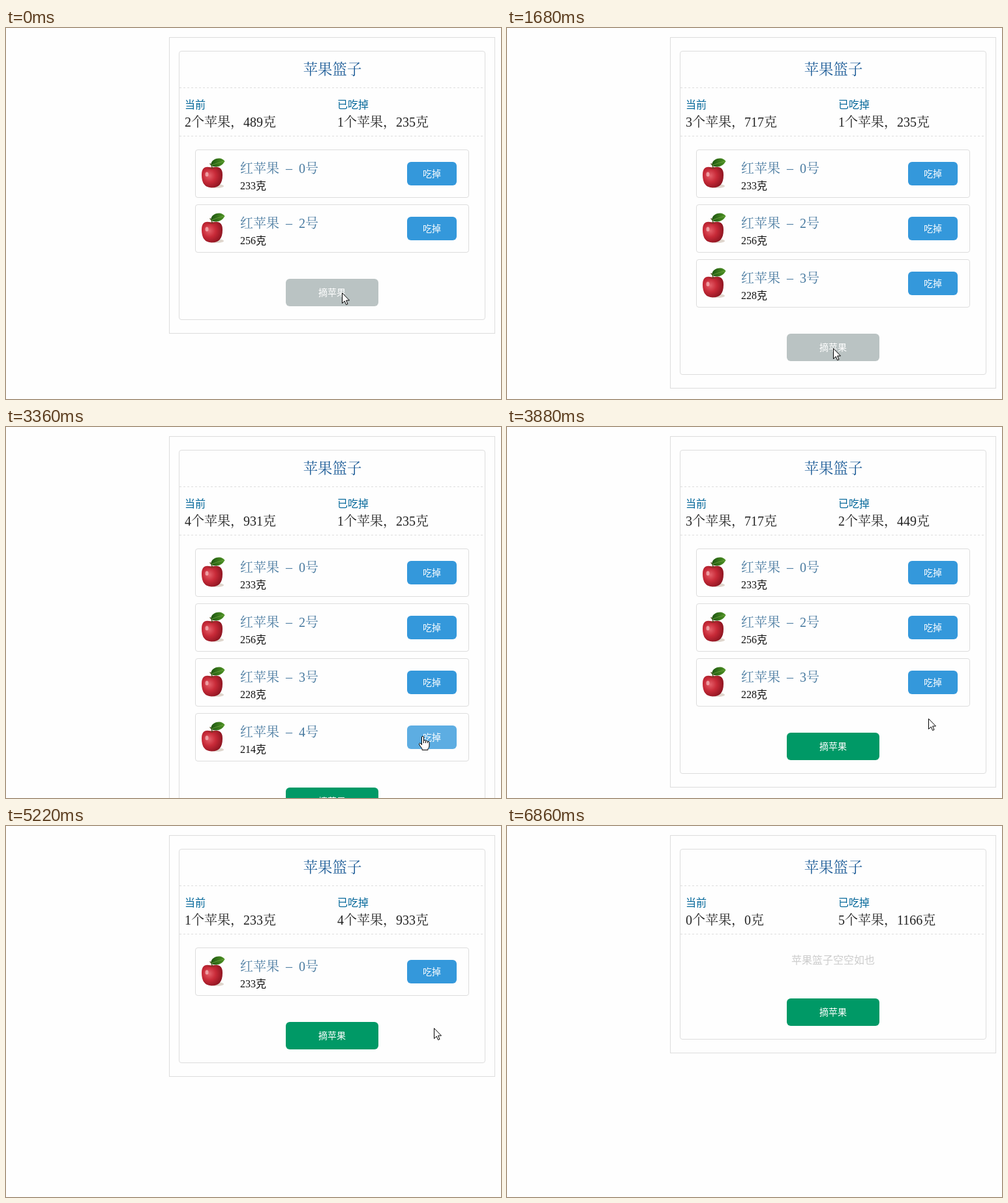
These frames come from a looping animation (759x568 px, 7770 ms). An HTML page:

```html
<!DOCTYPE html>
<html lang="zh-CN">
<head>
<meta charset="utf-8">
<title>苹果篮子</title>
<style>
html, body { margin: 0; width: 100%; height: 100%; overflow: hidden; background: #fefefe; }
body { position: relative; font: 300 16px/24px "Liberation Serif", "Noto Sans CJK SC", "Noto Sans CJK", serif; color: #111; }
div, svg { position: absolute; box-sizing: border-box; white-space: nowrap; }
#outer { left: 250px; top: 14px; width: 500px; border: 1px solid #ddd; }
#card { left: 265px; top: 35px; width: 470px; border: 1px solid #ddd; border-radius: 4px; }
.rule { left: 266px; width: 468px; height: 1px; background: repeating-linear-gradient(90deg, #ddd 0 3px, transparent 3px 6px); }
.title, .value, .name { font-family: "Liberation Serif", "Noto Serif CJK SC", "Noto Sans CJK SC", "Noto Sans CJK", serif; }
.title { left: 266px; width: 469px; top: 52px; text-align: center; font-size: 22.4px; font-weight: 500; color: #1a5a96; }
.label { top: 106px; color: #069; }
.value { top: 132px; font-size: 20px; color: #222; }
.left { left: 274px; }
.right { left: 508px; }
.item { left: 290px; width: 420px; height: 74px; border: 1px solid #ddd; border-radius: 4px; }
.item svg { left: -1px; top: -1px; }
.name { left: 68px; top: 16px; font-size: 20px; word-spacing: 5px; color: #47799f; }
.weight { left: 68px; top: 43px; }
.btn { color: #fff; font-size: 14px; text-align: center; border-radius: 6px; }
.eat { left: 324px; top: 18px; width: 76px; height: 36px; line-height: 37px; background: #3498db; }
.eat.hover { background: #5dade2; }
#pick { left: 429px; width: 142px; height: 42px; line-height: 43px; }
#list { left: 0; top: 0; }
#empty { left: 265px; width: 470px; top: 194px; text-align: center; color: #ccc; }
#cursor { left: 0; top: 0; overflow: visible; }
</style>
</head>
<body>
<div id="outer"></div>
<div id="card"></div>
<div class="title">苹果篮子</div>
<div class="rule" style="top:91px"></div>
<div class="rule" style="top:165px"></div>
<div class="label left">当前</div>
<div class="label right">已吃掉</div>
<div class="value left" id="now"></div>
<div class="value right" id="eaten"></div>
<div id="list"></div>
<div id="empty">苹果篮子空空如也</div>
<div class="btn" id="pick">摘苹果</div>

<svg width="0" height="0">
  <defs>
    <radialGradient id="skin" cx=".36" cy=".42" r=".7">
      <stop offset="0" stop-color="#e4606a"/>
      <stop offset=".45" stop-color="#c82a38"/>
      <stop offset="1" stop-color="#86121e"/>
    </radialGradient>
    <linearGradient id="leaf" x2="1">
      <stop offset="0" stop-color="#1d5410"/>
      <stop offset="1" stop-color="#4f9424"/>
    </linearGradient>
    <g id="apple">
      <ellipse cx="34" cy="56" rx="10" ry="3" fill="#ded5cc"/>
      <path fill="url(#skin)" d="M25 28Q10 23 10 39Q10 58 25 58.500Q42 59 42 39Q42 23 25 28Z"/>
      <path fill="#a3262b" d="M18 28.500Q26 26 33 28.500Q26 32 18 28.500Z"/>
      <path fill="none" stroke="#5a4a20" stroke-width="1.500" d="M26 29Q26 24 22.500 21.500"/>
      <path fill="url(#leaf)" d="M24 24Q25 14 37 13.500Q42 13.500 45.500 18Q41 26 33 26.500Q28 27 24 24Z"/>
      <path fill="none" stroke="#76aa46" stroke-width=".7" d="M25 24Q33 21 44 18"/>
      <ellipse cx="18" cy="38" rx="2.500" ry="3.500" fill="#f8c0c2" opacity=".7"/>
    </g>
  </defs>
</svg>

<svg id="cursor" width="1" height="1" fill="#fff" stroke="#000" stroke-linejoin="round">
  <path id="arrow" d="M.5 .7V16.500L4.200 13L6.600 18.500L9 17.500L6.600 12H11.500Z"/>
  <g id="hand">
    <path d="M-1.500 12V2Q-1.500 .5 0 .5T1.500 2V7Q3 5.500 4.500 7.500Q6 6.500 7.300 8.500Q10 7.500 10 10.500V15Q10 18 8 19.500V21.500H-1V19.500L-5 14Q-6.500 11.500-4.500 11Q-3 11-1.500 13.500Z"/>
    <path fill="none" d="M1.500 7V11M4.500 8V11M7.300 9V11"/>
  </g>
</svg>

<script>
const LOOP = 7770, TICK = 124, ROW = 84;
const apples = [[0, 233], [2, 256], [3, 228], [4, 214]];
const picks = [{ click: 0, done: 640 }, { click: 1430, done: 1800 }];
const eats = [3640, 4420, 5220, 6010];
const pointerGone = 6860;

// Pointer strokes: arrival time, number of ticks, x, y.
const strokes = [
  [0, 1, 515, 405], [240, 2, 508, 412], [1130, 4, 500, 490], [2050, 2, 511, 522],
  [2440, 3, 568, 540], [2590, 1, 557, 556], [3090, 1, 600, 539], [3360, 2, 639, 473],
  [4010, 3, 660, 391], [4690, 2, 656, 309], [5580, 3, 650, 244], [5860, 2, 636, 232],
  [6740, 4, 693, 534]
];

const $ = id => document.getElementById(id);
const passed = (times, t) => times.filter(time => time <= t).length;
const sum = rows => rows.reduce((total, [, grams]) => total + grams, 0);
const summary = (count, grams) => `${count}个苹果，${grams}克`;
const inside = ([x, y], left, top, width, height) =>
  x >= left && x < left + width && y >= top && y < top + height;

const countAt = t => 2 + passed(picks.map(p => p.done), t) - passed(eats, t);
const pickTopAt = t => countAt(t) ? 216 + ROW * countAt(t) : 264;
const overPick = (point, t) => inside(point, 429, pickTopAt(t), 142, 42);

function pointerAt(t) {
  return strokes.reduce(([px, py], [end, ticks, x, y]) => {
    const p = Math.max(0, Math.min(1, 1 + Math.floor((t - end) / TICK) / ticks));
    return [px + (x - px) * p, py + (y - py) * p];
  }, [515, 405]);
}

$("list").innerHTML = apples.map(([id, grams], i) => `
  <div class="item" style="top:${186 + ROW * i}px">
    <svg width="60" height="74"><use href="#apple"/></svg>
    <div class="name">红苹果 – ${id}号</div>
    <div class="weight">${grams}克</div>
    <div class="btn eat">吃掉</div>
  </div>`).join("");
const items = [...document.querySelectorAll(".item")];
const eatButtons = [...document.querySelectorAll(".eat")];

function draw(t) {
  const count = countAt(t), eatenNow = passed(eats, t);
  const point = pointerAt(t), pickTop = pickTopAt(t);
  const loading = picks.some(p => t >= p.click && t < p.done);
  const row = apples.findIndex((_, i) => i < count && inside(point, 615, 205 + ROW * i, 76, 36));
  const hand = row >= 0 || !loading && overPick(point, t);
  // The hover colour lingers for a tick after the button moves away.
  const lit = overPick(point, t - TICK + 4);

  $("now").textContent = summary(count, sum(apples.slice(0, count)));
  $("eaten").textContent = summary(1 + eatenNow, 235 + (eatenNow ? sum(apples.slice(count)) : 0));
  items.forEach((item, i) => item.style.display = i < count ? "" : "none");
  eatButtons.forEach((button, i) => button.classList.toggle("hover", i === row));
  $("empty").style.display = count ? "none" : "";
  $("pick").style.top = pickTop + "px";
  $("pick").style.background = loading ? "#bac3c3" : lit ? "#57db8f" : "#009966";
  $("card").style.height = pickTop + 28 + "px";
  $("outer").style.height = pickTop + 70 + "px";
  $("cursor").style.display = t < pointerGone ? "" : "none";
  $("cursor").style.transform = `translate(${point.map(v => Math.round(v) + "px")})`;
  $("arrow").style.display = hand ? "none" : "";
  $("hand").style.display = hand ? "" : "none";
}

function tick() {
  draw(performance.now() % LOOP);
  requestAnimationFrame(tick);
}
tick();
</script>
</body>
</html>
```
